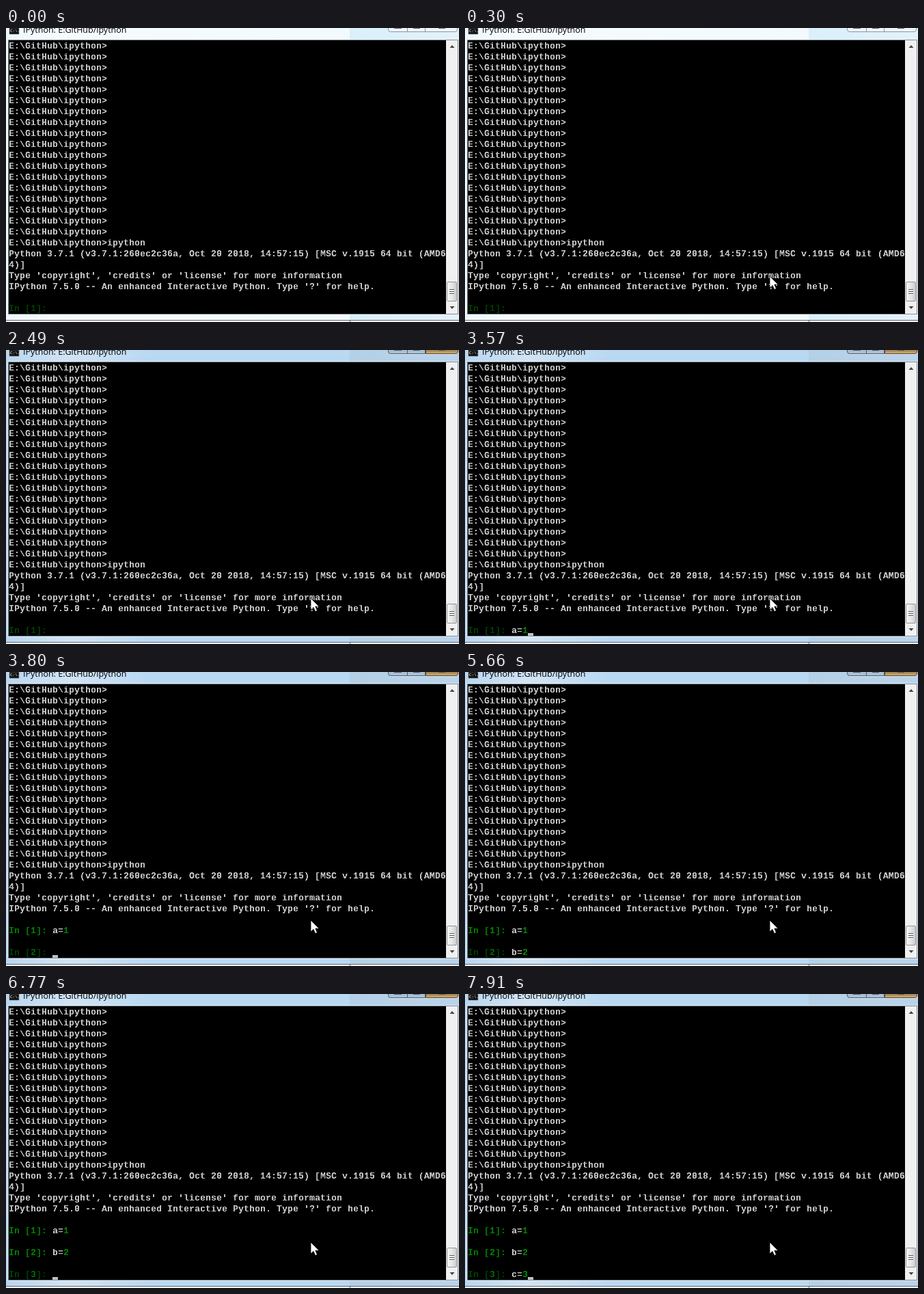
These frames come from a looping animation (663x430 px, 8 s). An HTML page:

```html
<!DOCTYPE html>
<html lang="en">
<head>
<meta charset="utf-8">
<title>IPython session</title>
<style>
  html, body { margin: 0; width: 663px; height: 430px; overflow: hidden; background: #fff; }
  svg, pre, #caret { position: absolute; left: 0; top: 0; }
  pre {
    left: 4px; top: 19px; margin: 0; color: #c0c0c0; filter: url(#crisp);
    font: bold 13.333px/16px "Liberation Mono", monospace; font-variant-ligatures: none;
  }
  #caret { top: 414px; width: 8px; height: 4px; background: #c0c0c0; }
  .prompt { color: #007800; }
  .prompt b, .digit { color: #008000; }
  .current { color: #003c00; }
  .current b { color: #006400; }
  .current.first b { color: #003c00; }
  .caption { font: 12.5px "Open Sans", sans-serif; fill: #000; }
  .focused .idle, body:not(.focused) .active { display: none; }
</style>
</head>
<body>
<svg width="663" height="430">
  <defs>
    <linearGradient id="pale">
      <stop offset="0" stop-color="#eef8fc"/><stop offset=".12" stop-color="#f6fbfd"/>
      <stop offset=".758" stop-color="#f2fafd"/><stop offset=".758" stop-color="#d9f0fa"/>
      <stop offset="1" stop-color="#e4f1f9"/>
    </linearGradient>
    <linearGradient id="blue">
      <stop offset="0" stop-color="#b9d6f0"/><stop offset=".14" stop-color="#d2e4f3"/>
      <stop offset=".32" stop-color="#b9d8f2"/><stop offset=".758" stop-color="#b9d8f2"/>
      <stop offset=".758" stop-color="#b4d0e6"/><stop offset="1" stop-color="#b9d3eb"/>
    </linearGradient>
    <linearGradient id="close" x2="0" y2="1">
      <stop offset="0" stop-color="#8c6c3c"/><stop offset="1" stop-color="#d0b27c"/>
    </linearGradient>
    <linearGradient id="thumb">
      <stop offset="0" stop-color="#f6f6f6"/><stop offset=".5" stop-color="#e6e6e6"/>
      <stop offset="1" stop-color="#cdcdcd"/>
    </linearGradient>
    <filter id="crisp" color-interpolation-filters="sRGB">
      <feComponentTransfer><feFuncA type="linear" slope="2.2" intercept="-.5"/></feComponentTransfer>
    </filter>
  </defs>

  <rect class="idle" width="663" height="427" fill="url(#pale)"/>
  <rect class="active" width="663" height="427" fill="url(#blue)"/>
  <path d="M0 427.5H663M503.5 427V430" stroke="#59636c"/>

  <path d="M5 0H19V9H5Z" fill="#111" stroke="#777" stroke-width=".6"/>
  <text x="6" y="6" font-family="Liberation Mono, monospace" font-size="6" fill="#fff">C:\.</text>
  <text class="caption" x="25" y="7">IPython: E:GitHub/ipython</text>

  <g class="idle" fill="#edf5fa" stroke="#8a969f">
    <path d="M559.5-2V2Q559.5 5.5 563 5.5H657Q660.5 5.5 660.5 2V-2M587.5 0V5M613.5 0V5"/>
    <path d="M568 .5H579M596 .5H606M633 .5H643" stroke="#596269"/>
  </g>
  <g class="active" stroke="#4d5d6c">
    <path d="M559.5-2V2Q559.5 5.5 563 5.5H613.5V-2" fill="#a9bfd4"/>
    <path d="M587.5 0V5"/>
    <path d="M614.5-2V5.5H657Q661.5 5.5 661.5 2V-2" fill="url(#close)" stroke="#5a4324"/>
    <path d="M568 .5H579M596 .5H606M633 .5H643"/>
    <path d="M562 6.5H659" stroke="#fff" stroke-opacity=".6"/>
  </g>

  <rect x="2.5" y="16.5" width="660" height="403" fill="none" stroke="#fff" stroke-opacity=".5"/>
  <rect x="3" y="17" width="659" height="402" fill="#7d8a94"/>
  <rect x="4" y="18" width="640" height="400"/>
  <rect x="644" y="18" width="17" height="400" fill="#f0f0f0"/>
  <rect x="645.5" y="371.5" width="14" height="28" rx="1.5" fill="url(#thumb)" stroke="#949494"/>
  <path d="M649 382.5H656M649 385.5H656M649 388.5H656" stroke="#555"/>
  <path d="M649 383.5H656M649 386.5H656M649 389.5H656" stroke="#fff"/>
  <path d="M649.5 29H656.5L653 25ZM649.5 407H656.5L653 411Z" fill="#444"/>
</svg>
<pre id="screen"></pre>
<div id="caret"></div>
<svg width="663" height="430">
  <path id="mouse" d="M0 0V17L4 13.3L6.7 19.5L9.5 18.2L6.9 12.2H12.2Z" fill="#fff" stroke="#000" stroke-width=".8"/>
</svg>
<script>
const LOOP = 8000, ROWS = 25;
const PATH = 'E:\\GitHub\\ipython>';
const BANNER = [
  ...Array(18).fill(PATH), PATH + 'ipython',
  'Python 3.7.1 (v3.7.1:260ec2c36a, Oct 20 2018, 14:57:15) [MSC v.1915 64 bit (AMD6',
  '4)]',
  "Type 'copyright', 'credits' or 'license' for more information",
  "IPython 7.5.0 -- An enhanced Interactive Python. Type '?' for help.",
  ''
].map(line => line.replace('>', '&gt;'));
const INPUT = 'a=1\nb=2\nc=3';

// [time, typed characters, caret visible]
const KEYS = [
  [0, 0, 0], [940, 0, 1], [1470, 0, 0], [2020, 0, 1], [2490, 0, 0],
  [2710, 1, 1], [3030, 1, 0], [3400, 2, 1], [3570, 3, 1],
  [3800, 4, 1], [4140, 4, 0], [4650, 4, 1], [5110, 5, 0],
  [5510, 6, 1], [5590, 7, 1], [5660, 7, 0],
  [5830, 8, 1], [6210, 8, 0], [6770, 8, 1], [7130, 9, 1],
  [7210, 9, 0], [7740, 10, 1], [7910, 11, 1]
];
// [time, x, y] of the pointer tip
const POINTER = [[0, 700, 440], [70, 560, 412], [150, 492, 384], [230, 446, 363]];
const FOCUS_TIME = 310;

const [screenEl, caretEl, mouseEl] =
  ['screen', 'caret', 'mouse'].map(id => document.getElementById(id));
const latest = (list, t) => list.findLast(item => item[0] <= t);
let shownCount = -1;

function inputLine(text, i, all) {
  const style = 'prompt' + (i === all.length - 1 ? ' current' : '') + (i ? '' : ' first');
  const code = text.replace(/\d/, '<span class="digit">$&</span>');
  return `<span class="${style}">In [<b>${i + 1}</b>]:</span> ${code}`;
}

function draw(now) {
  const t = now % LOOP;
  const [, count, caretOn] = latest(KEYS, t);
  const inputs = INPUT.slice(0, count).split('\n');
  if (count !== shownCount) {
    const lines = [...BANNER, inputs.map(inputLine).join('\n\n')].join('\n').split('\n');
    screenEl.innerHTML = lines.slice(-ROWS).join('\n');
    shownCount = count;
  }
  caretEl.style.left = 68 + 8 * inputs.at(-1).length + 'px';
  caretEl.style.visibility = caretOn ? 'visible' : 'hidden';

  const [, x, y] = latest(POINTER, t);
  mouseEl.setAttribute('transform', `translate(${x} ${y})`);
  document.body.classList.toggle('focused', t >= FOCUS_TIME);
  requestAnimationFrame(draw);
}
draw(0);
</script>
</body>
</html>
```
